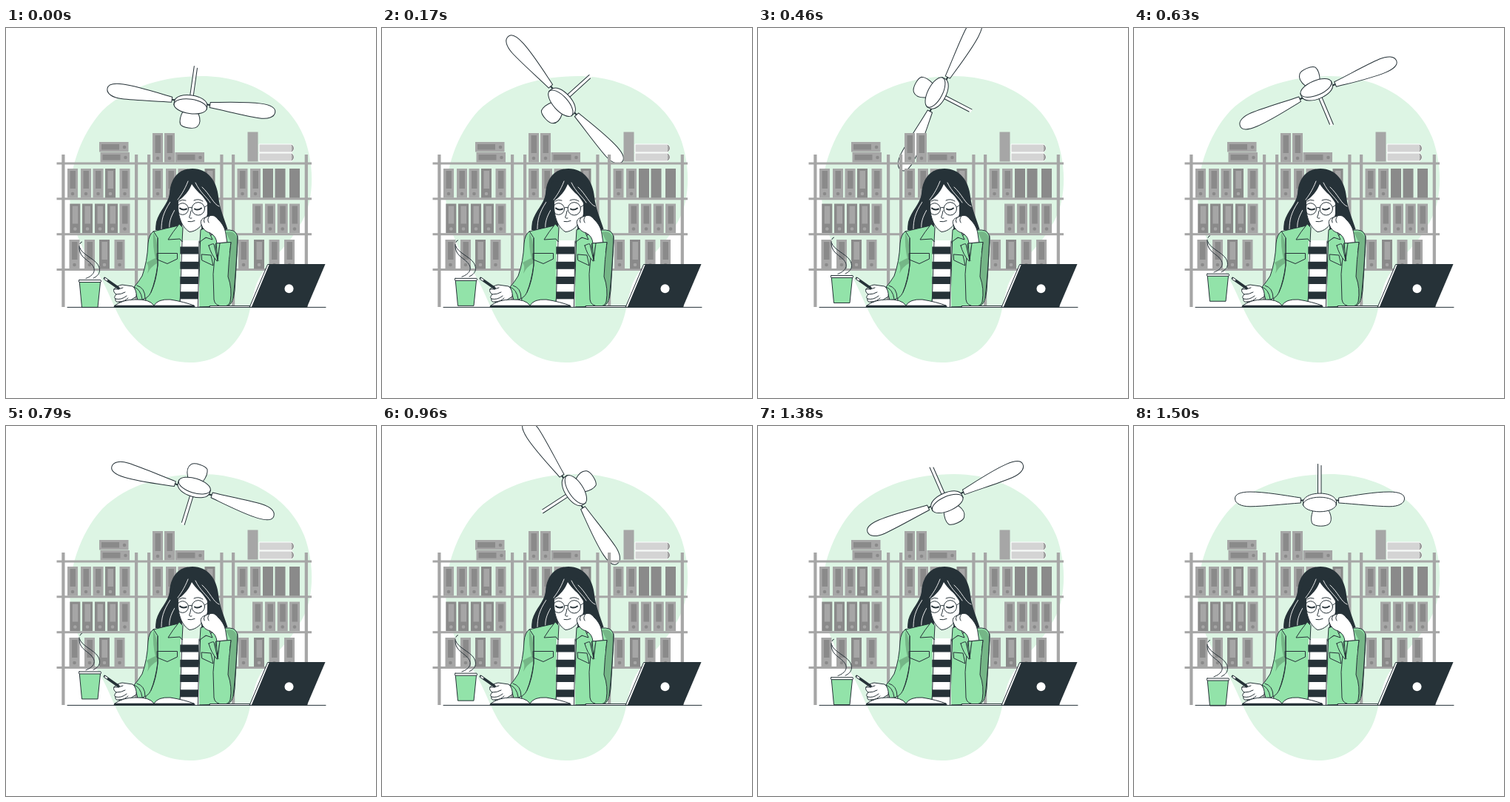
Recreate the animation shown at these times as an HTML page. Size 500x500 px, loop 1540 ms.

```html
<!DOCTYPE html>
<html lang="en">
<head>
<meta charset="utf-8">
<title>Study desk</title>
<style>
html, body { margin: 0; width: 100%; height: 100%; overflow: hidden; background: #fff; }
svg { display: block; width: 100%; height: 100%; }
.line { fill: none; stroke: #263238; stroke-width: 1; stroke-linecap: round; stroke-linejoin: round; }
.white { fill: #fff; }
.green { fill: #92e3a9; }
.pale { fill: #ddf5e4; }
.shade { fill: #75b687; }
.dark { fill: #263238; }
.hair { fill: none; stroke: #fff; stroke-width: .9; stroke-linecap: round; }
</style>
</head>
<body>
<svg viewBox="0 0 500 500">
  <path class="pale" d="M265 65C330 65 384 99 403 148C418 188 417 238 396 268C380 298 348 318 337 350C328 380 330 400 309 425C292 445 270 452 249 452C210 452 182 432 162 405C145 380 138 350 120 325C100 295 87 265 86 225C87 190 100 145 130 112C165 78 215 65 265 65Z"/>

  <g id="fan">
    <path class="white" d="M248.500 51H253V92H248.500Z"/>
    <path class="line" d="M248.500 51.500V92M253 53.500V92"/>
    <path class="line white" d="M242 114C239 122 239 128 241 132C245 136.300 260 136.300 264 132C267.500 128 267 121 263 114Z"/>
    <g id="blade">
      <path class="line" style="stroke-width:2" d="M272 100.500H278"/>
      <path class="line white" d="M277 97C300 93.500 325 89 345 89C358 89 365.500 92 365.500 98C365.500 105 357 108.800 345 108.800C325 108.500 300 105.500 277 104Z"/>
    </g>
    <use href="#blade" transform="translate(502 0) scale(-1 1)"/>
    <path class="line white" d="M228.500 103C228.500 87 273.500 87 273.500 103V107H228.500Z"/>
    <ellipse class="line white" cx="251" cy="106" rx="22.300" ry="9.800"/>
  </g>

  <g id="shelf"></g>

  <g id="cup">
    <g class="line" stroke-width=".8">
      <path d="M100 292Q100.500 290 102.500 289.500"/>
      <path d="M99 295C98 309 108 312 115 319C123 327 119 335 108 338.800"/>
      <path d="M99.500 297C102 306 119 312 124 320C130 330 124 336 118 338.500"/>
    </g>
    <path class="line green" d="M99.300 344L102.500 378H124L127.500 344Z"/>
    <path class="line white" d="M99 341H128Q129.200 342.500 128 344H99Q97.500 342.500 99 341Z"/>
  </g>

  <g id="woman">
    <path class="dark" d="M252 190C231 190 222 206 221 224C219 238 207 247 203 262Q202 268 202 273L230 275H290L299.500 272C295 257 289 245 287 228C285 207 273 190 252 190Z"/>
    <path class="hair" d="M222 235C212 250 210 260 210 272M228 246C222 256 220 264 221 272"/>

    <path class="line pale" d="M238 263L236 290H264L265 262Z"/>
    <path class="line green" d="M199 275Q215 271 233 267L238 289L235 377H188L190 350Z"/>
    <path class="line green" d="M263 287L285 276Q298 271 307 274Q314 277 313 290L309 355Q307 375 298 376L260 377Z"/>
    <path class="white" d="M236 287H261V377H235Z"/>
    <g id="stripes" class="dark"></g>
    <path class="line" d="M238 288L235 377M261 288L259.500 377"/>

    <path class="line green" d="M234 265Q225 276 219 286L235 285L238 289L239 270Z"/>
    <path class="line green" d="M263 273L262 289L270 283L279 286L272 270Z"/>

    <path class="line green" d="M199 275Q193 279 192 291Q191 316 184 335Q178 345 173 350Q176 359 178 368Q192 367 196 357Q203 342 205 321L205 284Z"/>
    <path class="shade" d="M199 277Q205 285 204.500 308L202 312Q198 295 199 277Z"/>
    <path class="shade" d="M190 317Q197 313 204 310V318Q196 322 191 332Q194 322 190 317Z"/>
    <path class="line" d="M205 284V320Q202 342 196 357M173 350Q182 353 184 366M177 348Q188 351 188 365"/>
    <path class="line" d="M204.500 304.500H231.500V312L218 318.500L204.500 313Z"/>
    <path class="line" d="M264.500 306L277 307L280 321L265 314Z"/>

    <path class="white" d="M233 231C231 248 235 268 248 275.500C259 275 269 264 272 251L272 232C264 226 257 220 251 211C247 221 241 228 233 231Z"/>
    <path class="line" d="M233 231C231 248 235 268 248 275.500C257 275 264 268 268 261"/>
    <path class="dark" d="M253 208C259 222 269 229 273 239L272.500 254L280 252L284 226L270 205ZM251 207C246 222 239 230 232 234L230 250L222 235L230 208Z"/>
    <path class="hair" d="M246 207C241 220 235 228 232 232M256 209C262 222 272 229 276 236M265 215C276 225 280 238 288 241"/>
    <g class="line">
      <circle cx="238.700" cy="244.500" r="7.800"/>
      <circle cx="259.800" cy="244.300" r="8.700"/>
      <path d="M246.500 243Q249 241.500 251.200 243M268.500 242L273 239M234 234Q238 231 243 233M254 233Q260 230 266 234"/>
      <path d="M250 247Q249 253 247.500 256Q249 258 251 257M246 261.500Q250 262.500 255 260.500"/>
    </g>
    <path class="line" style="stroke-width:2" d="M235 243.500Q239 247 244 244.500M255 244.500Q259 247 264 243.500"/>

    <path class="shade" d="M297 276Q311 272 312.500 288L308.500 350Q308 373 298 375.500Q306 352 300 336Q301 310 304 290Z"/>
    <path class="line white" d="M264 266C262 261 264 258 269 256L276 253.500Q282 252 287 259C293 265 296 271 297 278L299 291H285Q284 281 276 277Q267 275 264 266Z"/>
    <path class="line" d="M269 256Q266 260 268 263M275 254Q271 259 274 263"/>
    <path class="line green" d="M284 291L304 289.500Q301 312 300 336Q306 352 303 370Q301 376 294 376Q282 376 281 367L280 333Z"/>
    <path class="line green" d="M274 294Q279 291 281 292L286 314L289 290.500L304 289.500L302 302Q290 315 285 315Q277 306 274 294Z"/>
    <path class="green" d="M288 291.500L303 290.500L301 311L287 315Z"/>
    <path class="line" d="M313 281Q311 330 307 365M284 291L286 313M289 291L286 313"/>

    <path class="line white" d="M146 353Q150 348 157 347L171 349Q177 354 176 363Q170 366 165 371Q157 374 153 370Q147 371 148 366Q145 364 149 360Q144 356 146 353Z"/>
    <path class="line" d="M149 360Q156 360 161 357M148 366Q156 368 163 362M153 370Q160 370 165 365M146 353Q152 354 158 351"/>
    <path class="line" style="stroke-width:3.6" d="M133.500 338.500L152 351.500"/>
    <path d="M133.500 338.500L137 341" stroke="#fff" stroke-width="2"/>
  </g>

  <g id="desk">
    <path class="line" d="M83 377.400H432"/>
    <path class="line white" d="M147 375Q158 367 174 367Q194 366 200 375Q205 366 222 367Q241 370 254 375Z"/>
    <path class="line" style="stroke-width:2.400" d="M147 376.300H254"/>
    <path class="line white" d="M275.500 375.500H331V377.500H275.500Z"/>
    <path class="line white" d="M354 319.500H358L334 377.300H329.500Z"/>
    <path class="dark" d="M356 319H431.500L406.500 377.800H331.500Z"/>
    <circle class="white" cx="382.500" cy="352.300" r="6"/>
  </g>
</svg>
<script>
const $ = id => document.getElementById(id);
const rect = (x, y, w, h, fill) => `<rect x="${x}" y="${y}" width="${w}" height="${h}" fill="${fill}"/>`;
const LIGHT = '#a6a6a6', DEEP = '#8a8a8a';

function binder(x, y, body = LIGHT, label = DEEP) {
  return rect(x, y, 14, 39.5, body) + rect(x + 3.5, y + 3, 7.5, 24, label) +
    `<circle cx="${x + 7}" cy="${y + 34}" r="2.3" fill="${label}"/>`;
}
const row = (y, xs) => xs.map(x => binder(x, y)).join('');
const deepRow = (y, xs) => xs.map(x => binder(x, y, DEEP, LIGHT)).join('');
const lying = (x, y) => rect(x, y, 39.5, 13.5, LIGHT) + rect(x + 3, y + 3, 24, 7.5, DEEP) +
  `<circle cx="${x + 34}" cy="${y + 7}" r="2.3" fill="${DEEP}"/>`;
const book = y => `<path d="M342 ${y}H386Q392 ${y + 5.5} 386 ${y + 11}H342Z" fill="#d4d4d4" stroke="#fff"/>` +
  `<path d="M386 ${y + 1}Q391 ${y + 5.5} 386 ${y + 10}" fill="${LIGHT}" stroke="${DEEP}"/>`;

$('shelf').innerHTML =
  [75.3, 174, 191, 289.3, 305, 403.7].map(x => rect(x, 171, 4.2, 206, LIGHT)).join('') +
  [181.5, 229.3, 277.2, 325].map(y => rect(68.5, y, 344.5, 3, LIGHT)).join('') +
  row(190, [83, 101, 117.5, 153.5, 198, 216, 232.5, 312.5, 330]) + deepRow(190, [134, 268.5]) +
  [347, 363.5, 383].map(x => rect(x, 190, 14, 39.5, DEEP)).join('') +
  deepRow(237.5, [86.3, 103, 120, 137]) + row(237.5, [153.5, 333, 350, 366.7, 383]) +
  row(286, [85.5, 106, 146.5, 314, 355.5, 376]) + deepRow(286, [126, 335]) +
  row(142, [198, 214]) + lying(126, 154) + lying(127.5, 168) + lying(228.5, 168) +
  rect(326.5, 140.5, 14, 40, LIGHT) + book(157) + book(169);

$('stripes').innerHTML = [295.5, 315.8, 336, 356.3].map(y => rect(235.3, y, 24.7, 10, '#263238')).join('');

const LOOP = 1540, STEP = 1000 / 24, LAST = 36;
const FIRST_DEG = 8, DEG_PER_TICK = 9.95;

function draw(ms) {
  const tick = Math.min(LAST, Math.floor((ms % LOOP + 3.5) / STEP));
  const deg = Math.min(360, FIRST_DEG + DEG_PER_TICK * tick);
  const lift = 10 * (1 - Math.abs(deg / 180 - 1));
  $('fan').setAttribute('transform', `rotate(${deg} 251 93)`);
  $('cup').setAttribute('transform', `translate(0 ${-lift})`);
}

let start;
function loop(now) {
  start ??= now;
  draw(Math.max(0, now - start));
  requestAnimationFrame(loop);
}
draw(0);
requestAnimationFrame(loop);
</script>
</body>
</html>
```
